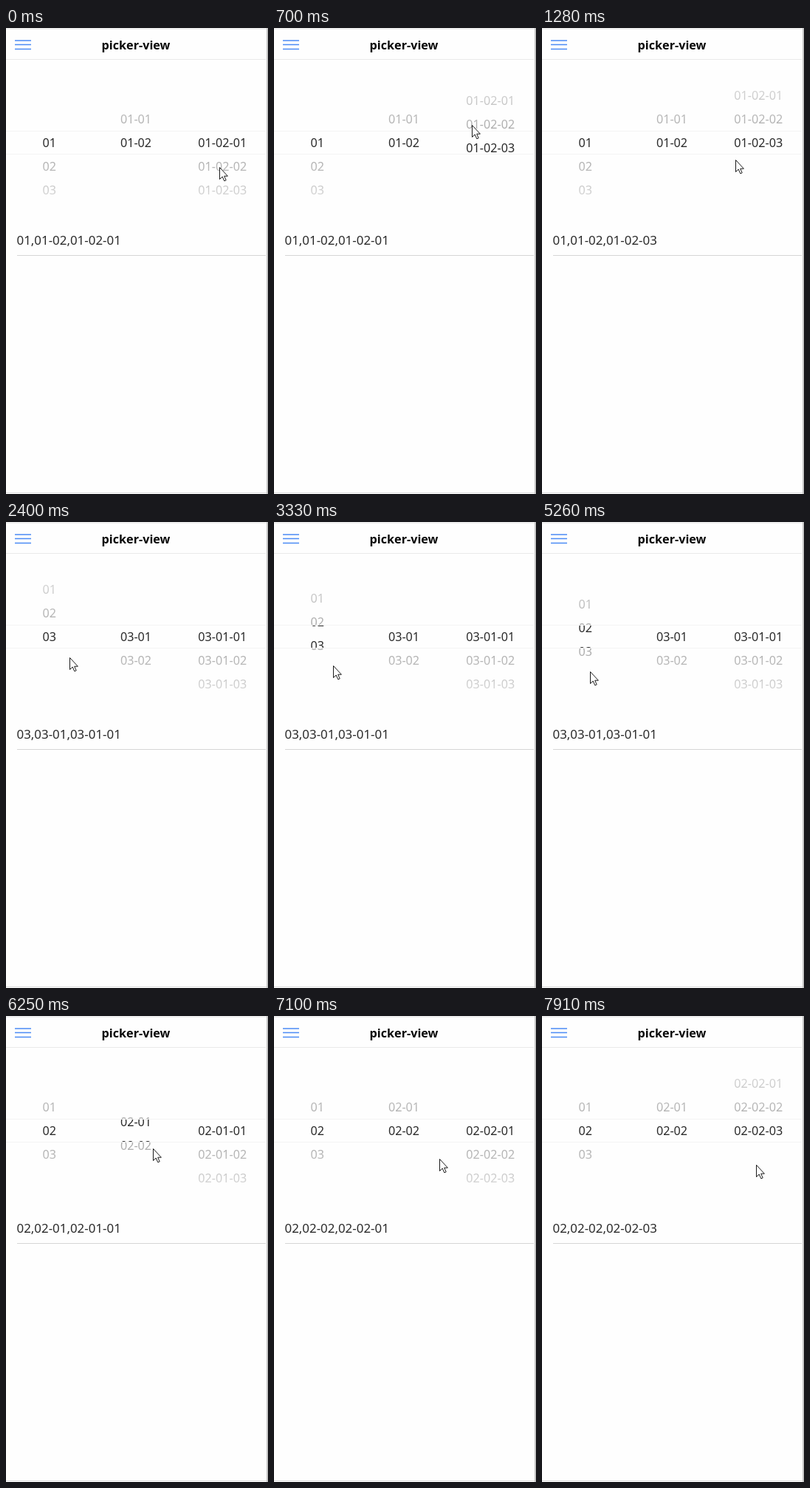
An HTML page for the animation above (8000 ms loop, 355 px wide and 630 px high).

```html
<!DOCTYPE html>
<html lang="en">
<head>
<meta charset="utf-8">
<title>picker-view</title>
<style>
  html, body { margin: 0; width: 100%; height: 100%; overflow: hidden; background: #fefefe; }
  svg { display: block; width: 355px; height: 630px; font-family: "Noto Sans", "Open Sans", sans-serif; }
  .column { font-size: 16.2px; text-anchor: middle; fill: #2a2a2a; }
</style>
</head>
<body>
<svg viewBox="0 0 355 630">
  <defs>
    <linearGradient id="fadeTop" x2="0" y2="1">
      <stop stop-color="#fefefe" stop-opacity=".95"/>
      <stop offset="1" stop-color="#fefefe" stop-opacity=".6"/>
    </linearGradient>
    <linearGradient id="fadeBottom" x2="0" y2="1">
      <stop stop-color="#fefefe" stop-opacity=".6"/>
      <stop offset="1" stop-color="#fefefe" stop-opacity=".95"/>
    </linearGradient>
  </defs>

  <rect width="355" height="630" fill="#fefefe"/>
  <g id="columns"></g>
  <rect y="43" width="352" height="96" fill="url(#fadeTop)"/>
  <rect y="171" width="352" height="96" fill="url(#fadeBottom)"/>
  <path d="M0 139.5H352M0 170.5H352" stroke="#f4f4f4"/>

  <path d="M0 1H355" stroke="#ededed" stroke-width="2"/>
  <path d="M0 42.5H352" stroke="#e9e9e9"/>
  <path d="M12 17H34M12 22.5H34M12 28.5H34" stroke="#4b8bf5" stroke-width="1.7"/>
  <text x="176" y="29" font-size="16.2" font-weight="700" text-anchor="middle" fill="#080808">picker-view</text>

  <text id="value" x="14.5" y="293" font-size="16.9" fill="#2a2a2a"></text>
  <path d="M15 307.5H352" stroke="#d6d6d6"/>
  <path d="M0 628.5H355" stroke="#dcdcdc"/>
  <path d="M354 0V630" stroke="#c4c4c4" stroke-width="2"/>
  <path id="cursor" d="M.5 .5V16.5L4.2 13L6.8 18.8L9.2 17.8L6.7 12.2H11.4Z" fill="#fff" stroke="#1a1a1a"/>
</svg>
<script>
const LOOP = 8000, ROW = 32;
const FIRST_REFRESH = 280, REFRESH = 138.5; // the screen updates in steps
const MOVE = 260, SETTLE = 220;             // reaching for a column, snapping after release

// Each drag swings its column by some rows; half a turn is a plain one-way drag.
const drags = [
  { column: 2, start: 320, end: 800, by: 2, turns: .5, grip: [289, 188], rest: [262, 178] },
  { column: 0, start: 1560, end: 2000, by: 2, turns: .5, grip: [86, 186], rest: [86, 183] },
  { column: 0, start: 2550, end: 5300, by: -.82, turns: 2.7, grip: [86, 182], rest: [65, 205] },
  { column: 1, start: 6080, end: 6440, by: 1, turns: .5, grip: [180, 192], rest: [224, 193] },
  { column: 2, start: 7400, end: 7670, by: 2, turns: .5, grip: [289, 198], rest: [290, 201] }
];

const mix = (a, b, u) => a + (b - a) * u;
const progress = (t, start, end) => Math.min(1, Math.max(0, (t - start) / (end - start)));
const swing = turns => (1 - Math.cos(2 * Math.PI * turns)) / 2;
const ease = u => swing(u / 2);

function stateAt(t) {
  const rows = [0, 1, 0];
  let chosen = [...rows], pointer = drags[0].grip;
  for (const { column, start, end, by, turns, grip, rest } of drags) {
    const reach = ease(progress(t, start - MOVE, start));
    pointer = pointer.map((v, i) => mix(v, grip[i], reach));
    if (t < start) break;

    const held = progress(t, start, end);
    const settled = ease(progress(t, end, end + SETTLE));
    const shift = by * swing(turns * held);
    const dragged = rows[column] + shift;
    rows[column] = mix(dragged, Math.round(dragged), settled);
    pointer = [mix(grip[0], rest[0], held), mix(grip[1] - shift * ROW, rest[1], settled)];
    if (settled < 1) break;

    rows.fill(0, column + 1);
    chosen = [...rows];
  }
  return { rows, chosen, pointer };
}

const svgNode = (name, attrs, parent) => {
  const node = document.createElementNS("http://www.w3.org/2000/svg", name);
  for (const key in attrs) node.setAttribute(key, attrs[key]);
  return parent.appendChild(node);
};
const $ = id => document.getElementById(id);

const columns = [3, 2, 3].map((count, i) => {
  const group = svgNode("g", { class: "column" }, $("columns"));
  const x = 58.7 + i * 117.3;
  const items = Array.from({ length: count }, (_, row) => svgNode("text", { x, y: 161.2 + row * ROW }, group));
  return { group, items };
});

const label = index => "0" + (index + 1);

function draw(t) {
  const { rows, chosen, pointer } = stateAt(t);
  const path = chosen.map((_, i) => chosen.slice(0, i + 1).map(label).join("-"));
  columns.forEach(({ group, items }, i) => {
    const prefix = i ? path[i - 1] + "-" : "";
    items.forEach((item, row) => item.textContent = prefix + label(row));
    group.setAttribute("transform", `translate(0 ${-ROW * rows[i]})`);
  });
  $("value").textContent = path.join(",");
  $("cursor").setAttribute("transform", `translate(${pointer.map(Math.round)})`);
}

function tick() {
  const t = performance.now() % LOOP;
  const step = Math.floor((t - FIRST_REFRESH) / REFRESH + .2);
  draw(FIRST_REFRESH + step * REFRESH);
  requestAnimationFrame(tick);
}
tick();
</script>
</body>
</html>
```
